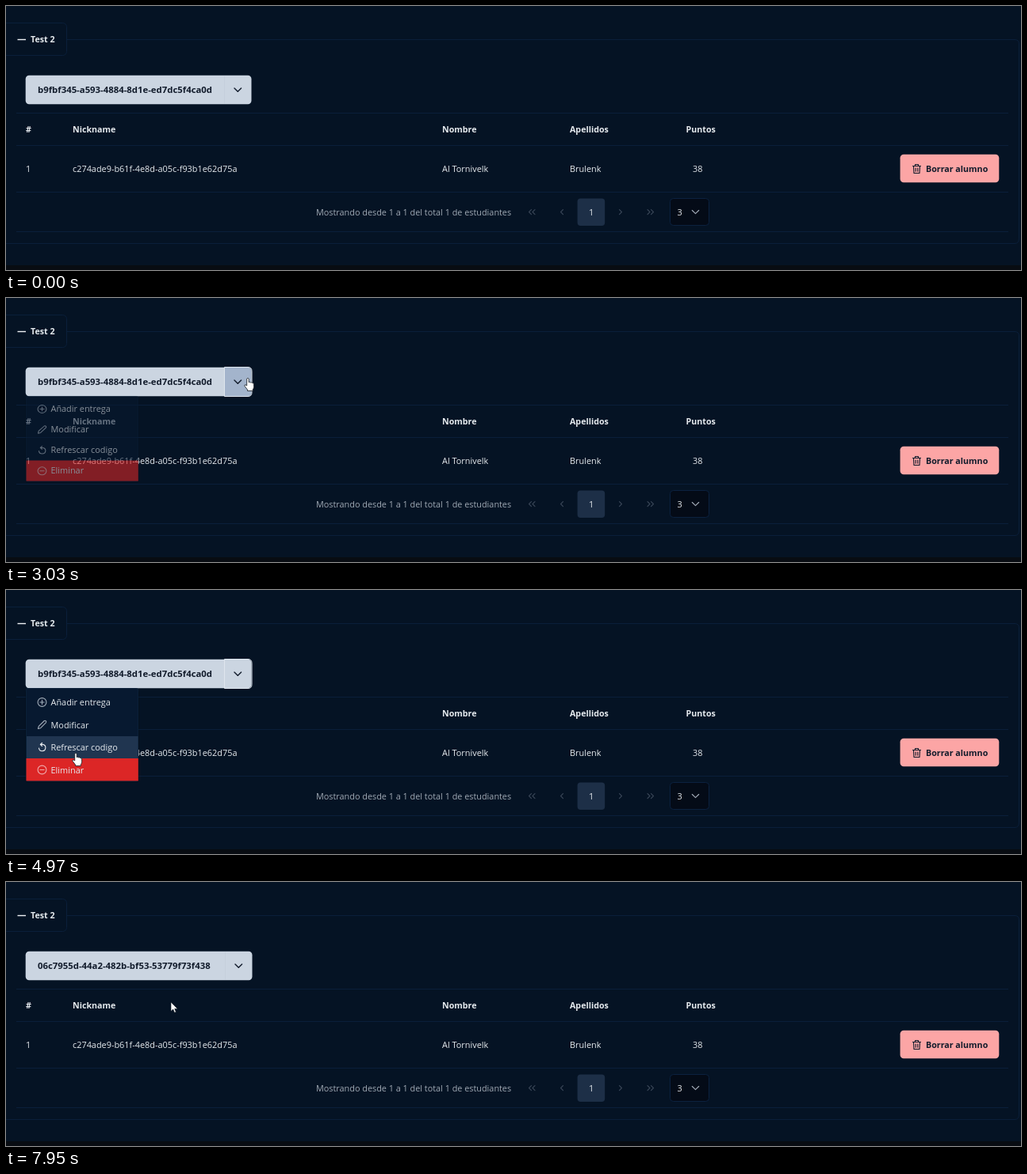
Animation, 1280 px wide and 334 px high, one loop 8 s. Source, as an HTML page:

```html
<!DOCTYPE html>
<html lang="es">
<head>
<meta charset="utf-8">
<title>Alumnos</title>
<style>
  html, body { margin: 0; width: 100%; height: 100%; overflow: hidden; background: #051324; }
  svg { display: block; width: 100%; height: 100%; }
  text { font: 10.9px "Open Sans", "Noto Sans", sans-serif; fill: #e6eaee; white-space: pre; }
  .b { font-weight: 700; font-size: 10.7px; }
  .dark { fill: #111b2b; }
  .id { font-size: 11.36px; }
  .muted { fill: #a0a9b4; font-size: 10.85px; }
  .line { stroke: #0a1f3a; fill: none; }
  .icon { fill: none; stroke: #a3adb9; stroke-width: 1.1; stroke-linecap: round; stroke-linejoin: round; }
  .dim { stroke: #3c495a; }
  .ink { stroke: #111b2b; }
</style>
</head>
<body>
<svg viewBox="0 0 1280 334" preserveAspectRatio="none">
  <rect width="1280" height="334" fill="#051324"/>
  <rect y="328" width="1280" height="6" fill="#080c12"/>
  <g class="line">
    <path d="M77 42.500H1272Q1277.500 42.500 1277.500 48V294Q1277.500 300.500 1272 300.500H0"/>
    <path d="M13 135.500H1264M13 176.500H1264M13 235.500H1264M13 285.500H1264"/>
    <rect x="-6" y="21.500" width="82.500" height="41" rx="5" fill="#051324"/>
  </g>
  <path d="M14.500 42.500H25" stroke="#eef1f4" stroke-width="1.400"/>
  <text class="b" x="31" y="46">Test 2</text>
  <g id="table"></g>

  <g id="delete">
    <rect x="1127.600" y="187.700" width="124.700" height="35.600" rx="4.500" fill="#fca5a5"/>
    <path class="icon ink" d="M1143.500 202.500H1153.500M1146.500 202.500V200.500H1150.500V202.500M1144.500 202.500L1145 211.500H1152L1152.500 202.500M1147.200 205V209.200M1149.800 205V209.200"/>
    <text class="b dark" x="1160" y="210">Borrar alumno</text>
  </g>

  <text class="muted" x="391" y="265">Mostrando desde 1 a 1 del total 1 de estudiantes</text>
  <rect x="720.600" y="243.500" width="34.600" height="34.500" rx="4" fill="#1d2f47"/>
  <text x="735" y="265">1</text>
  <rect x="837.500" y="243.500" width="49" height="34" rx="4" fill="#040b17" stroke="#0b213f"/>
  <text x="846.500" y="265">3</text>
  <path class="icon" d="M865.300 258.500L869.500 262.700 873.700 258.500"/>
  <g class="icon dim">
    <path id="back" d="M662.500 257.700L659.500 260.700 662.500 263.700M667 257.700L664 260.700 667 263.700M702.500 257.700L699.500 260.700 702.500 263.700"/>
    <use href="#back" transform="translate(1476 0) scale(-1 1)"/>
  </g>

  <g id="split">
    <rect id="body" x="24.700" y="87.700" height="36.500" rx="4.500" fill="#cbd5e1"/>
    <text id="code" class="b dark id" x="40" y="110"></text>
    <g id="arrow">
      <path d="M275.500 88.500V123.500" stroke="#c1ccd9" stroke-width=".6"/>
      <path id="hover" d="M275 88H305Q309.500 88 309.500 92.500V119.500Q309.500 124 305 124H275Z" fill="#a3b4cc"/>
      <path id="ring" d="M275.500 87.500H305Q310 87.500 310 92.500V119.500Q310 124.500 305 124.500H275.500Z" fill="none" stroke="#dfe6ee"/>
      <path class="icon ink" d="M288 104L292.300 108.300 296.600 104" style="stroke-width:1.4"/>
    </g>
  </g>

  <g id="menu">
    <rect x="24" y="126" width="144" height="118" rx="4" opacity=".16"/>
    <rect x="25.500" y="124.500" width="141" height="117.500" rx="2" fill="#071930" stroke="#0a2038"/>
    <rect x="25.500" y="213" width="141.300" height="28.500" fill="#dc2626"/>
    <rect id="mark" x="26" width="140.500" height="28" fill="#203550"/>
    <g id="items"></g>
  </g>

  <g id="cursor" stroke="#10161f" fill="#fff">
    <path id="pointer" d="M0 0V11.600L2.700 9.100 4.500 13.200 6.400 12.400 4.700 8.400H8.300Z" stroke-width=".6"/>
    <path id="hand" d="M-1.300 1.200Q0-.6 1.200 1.200V5.600Q2.600 4.800 3.500 6 5 5.300 5.800 6.600 7.500 6.300 7.600 8V11.500Q7.600 13.500 6.300 14.500V16.500H-.5V15L-4 10.500Q-4.600 8.800-2.900 8.800L-1.300 10Z" stroke-width=".8"/>
  </g>
</svg>
<script>
const LOOP = 8000, ROW = 28.5, ROW_TOP = 127.5, MENU_TOP = 124;
const OPEN = 3010, CHOOSE = 5220, FADE = 5270, CLOSED = 5370, RENEW = 7750;
const HOVER_LAG = 140;

const $ = id => document.getElementById(id);
const ramp = (t, from, to) => Math.max(0, Math.min(1, (t - from) / (to - from)));
const within = (t, from, to) => t >= from && t < to;
const show = (id, amount) => $(id).setAttribute('opacity', +amount);
const label = (x, y, text, cls = '') => `<text x="${x}" y="${y}" class="${cls}">${text}</text>`;

const columns = [
  [25, '#', '1'],
  [84, 'Nickname', 'c274ade9-b61f-4e8d-a05c-f93b1e62d75a'],
  [550, 'Nombre', 'Al Tornivelk'],
  [711, 'Apellidos', 'Brulenk'],
  [857.5, 'Puntos', '38', 8.5]
];
$('table').innerHTML = columns.map(([x, title, value, indent = 0]) =>
  label(x, 160, title, 'b') + label(x + indent, 210, value)).join('');

// Icons are drawn around their own centre.
const disc = '<circle r="5.400"/>';
const items = [
  ['Añadir entrega', disc + '<path d="M-2.600 0H2.600M0-2.600V2.600"/>'],
  ['Modificar', '<path d="M-5 5L-4.200 1.800 2.800-5Q4-5.600 4.900-4.600 5.600-3.600 4.800-2.700L-1.900 4.200Z"/>'],
  ['Refrescar codigo', '<path d="M-2-3.600H1A4.200 4.200 0 1 1-4 1M0-5.600L-2.200-3.600 0-1.500"/>'],
  ['Eliminar', disc + '<path d="M-2.600 0H2.600"/>']
];
$('items').innerHTML = items.map(([name, icon], i) => {
  const y = 142 + i * ROW;
  return `<g class="icon" transform="translate(45.500 ${y})">${icon}</g>` + label(56.5, y + 4, name);
}).join('');
const icons = [...document.querySelectorAll('#items .icon')];

// Each sweep is a quadratic curve: start, end, control point, destination.
const origin = [1242, 330];
const sweeps = [
  [130, 930, [-531, 100], [484, 8]],
  [1030, 1750, [288, 60], [322, 91]],
  [1850, 2220, [322, 118], [299, 90]],
  [2440, 2460, [294, 90], [288, 90]],
  [2680, 2900, [294, 98], [305, 101]],
  [3810, 4550, [60, 202], [90, 201]],
  [4650, 4670, [89, 204], [88, 206]],
  [5850, 6590, [261, 158], [326, 128]],
  [6690, 7450, [522, 90], [341, 47]],
  [7550, 7950, [290, 90], [208, 152]]
];

function cursorAt(t) {
  let from = origin;
  for (const [start, end, via, to] of sweeps) {
    if (t < start) break;
    const k = ramp(t, start, end), u = 1 - k;
    from = from.map((p, i) => u * u * p + 2 * u * k * via[i] + k * k * to[i]);
  }
  return from;
}

function activeItem(t) {
  const [x, y] = cursorAt(Math.min(t, CHOOSE) - HOVER_LAG);
  return x > 166 || y < ROW_TOP ? -1 : Math.floor((y - ROW_TOP) / ROW);
}

function drawMenu(t) {
  const grow = 1 - Math.pow(1 - ramp(t, OPEN, OPEN + 120), 4.5);
  const scale = .8 + .2 * grow;
  show('menu', t < FADE ? grow : t < CLOSED ? .57 : 0);
  $('menu').setAttribute('transform', `translate(0 ${MENU_TOP * (1 - scale)}) scale(1 ${scale})`);

  const active = activeItem(t);
  show('mark', active >= 0);
  $('mark').setAttribute('y', ROW_TOP + active * ROW + .5);
  $('mark').setAttribute('stroke', t >= CHOOSE ? '#527ba8' : 'none');
  icons.forEach((el, i) => el.style.stroke = i === active ? '#eef1f4' : i === 3 ? '#f0a9ab' : '');
}

function drawButtons(t) {
  show('hover', ramp(t, 2720, 2850) - ramp(t, 3850, 4000));
  show('ring', within(t, OPEN, CHOOSE));

  // Both buttons are dimmed while the request runs.
  const busy = ramp(t, 5400, 5500) - ramp(t, 5850, 5950);
  for (const id of ['split', 'delete']) show(id, 1 - .4 * busy);

  const renewed = t >= RENEW;
  $('code').textContent = renewed
    ? '06c7955d-44a2-482b-bf53-53779f73f438'
    : 'b9fbf345-a593-4884-8d1e-ed7dc5f4ca0d';
  $('body').setAttribute('width', 284.8 + renewed);
  $('arrow').setAttribute('transform', `translate(${+renewed} 0)`);
}

function drawCursor(t) {
  const hand = within(t, 2720, 5400);
  show('cursor', t >= sweeps[0][0]);
  show('hand', hand);
  show('pointer', !hand);
  $('cursor').setAttribute('transform', `translate(${cursorAt(t).join(' ')})`);
}

function render(t) {
  drawMenu(t);
  drawButtons(t);
  drawCursor(t);
}

const start = performance.now();
function tick(now) {
  render(Math.max(0, now - start) % LOOP);
  requestAnimationFrame(tick);
}
render(0);
requestAnimationFrame(tick);
</script>
</body>
</html>
```
